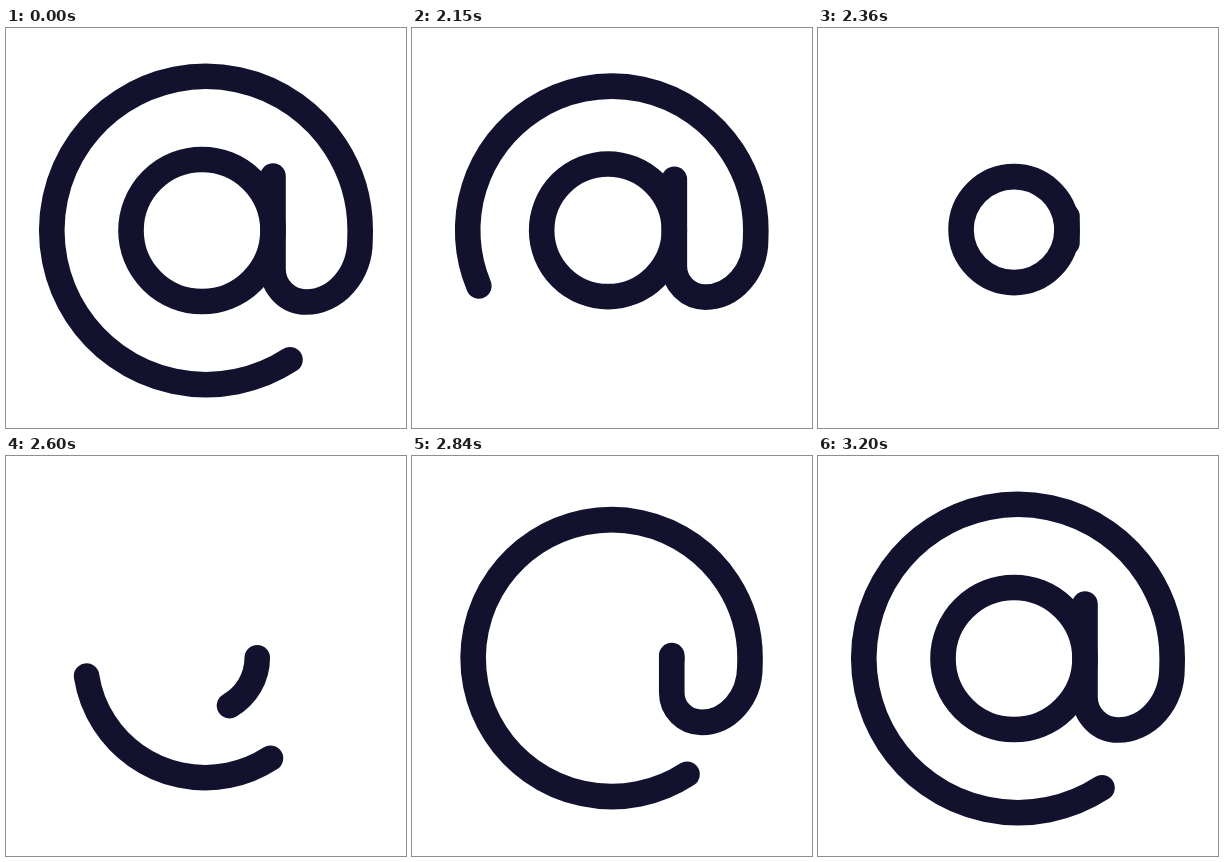
An HTML page with a canvas for the animation above (3.23 s loop, 400x400 px).

```html
<!DOCTYPE html>
<html lang="en">
<head>
<meta charset="utf-8">
<title>At sign</title>
<style>
  html, body { margin: 0; height: 100%; overflow: hidden; background: #fff; }
  canvas { display: block; }
</style>
</head>
<body>
<canvas id="stage" width="400" height="400"></canvas>
<script>
const ctx = document.getElementById('stage').getContext('2d');
const LOOP = 3230, HOLD = 2030, STROKE = 25.6;
const PIVOT = { x: 196, y: 199 };
const TAIL_ANGLE = 57 * Math.PI / 180;

const sweep = new Path2D();
sweep.arc(200, 202.5, 154.2, TAIL_ANGLE, 2 * Math.PI);
sweep.lineTo(354, 212);
sweep.ellipse(300, 212, 54, 62, 0, 0, Math.PI / 2);
sweep.arc(300, 241, 33, Math.PI / 2, Math.PI);
sweep.lineTo(267, 148);
const SWEEP_LENGTH = 154.2 * (2 * Math.PI - TAIL_ANGLE) + 9.5 + 91.2 + 33 * Math.PI / 2 + 93;

const ring = new Path2D();
ring.arc(196, 202.5, 71, 0, 2 * Math.PI);
const RING_LENGTH = 71 * 2 * Math.PI;

// Sine ease from 0 to 1 between two times
function ease(t, start, end) {
  const x = Math.min(1, Math.max(0, (t - start) / (end - start)));
  return (1 - Math.cos(Math.PI * x)) / 2;
}

function strokePart(path, length, from, to) {
  if (to - from < 0.0005) return;
  ctx.setLineDash([(to - from) * length + (to === 1 ? 2 : 0), length * 2]);
  ctx.lineDashOffset = -from * length;
  ctx.stroke(path);
}

function draw(time) {
  const t = time < HOLD ? 0 : time;
  const shrink = Math.min(ease(t, 2001, 2485), 1 - ease(t, 2290, 3203));
  const scale = 1 - 0.3 * shrink;

  ctx.setTransform(1, 0, 0, 1, 0, 0);
  ctx.fillStyle = '#fff';
  ctx.fillRect(0, 0, 400, 400);
  ctx.translate(PIVOT.x, PIVOT.y);
  ctx.scale(scale, scale);
  ctx.translate(-PIVOT.x, -PIVOT.y);
  ctx.strokeStyle = '#12122f';
  ctx.lineWidth = STROKE / scale;
  ctx.lineCap = ctx.lineJoin = 'round';

  if (t < 2424) {
    strokePart(sweep, SWEEP_LENGTH, ease(t, 2008, 2433), 1 - 0.07 * ease(t, 2300, 2420));
  } else {
    strokePart(sweep, SWEEP_LENGTH, 0, ease(t, 2426, 2910));
  }
  strokePart(ring, RING_LENGTH, 0, t < 2750 ? 1 - ease(t, 2330, 2700) : ease(t, 2830, 3200));
}

function tick() {
  draw(performance.now() % LOOP);
  requestAnimationFrame(tick);
}
tick();
</script>
</body>
</html>
```
